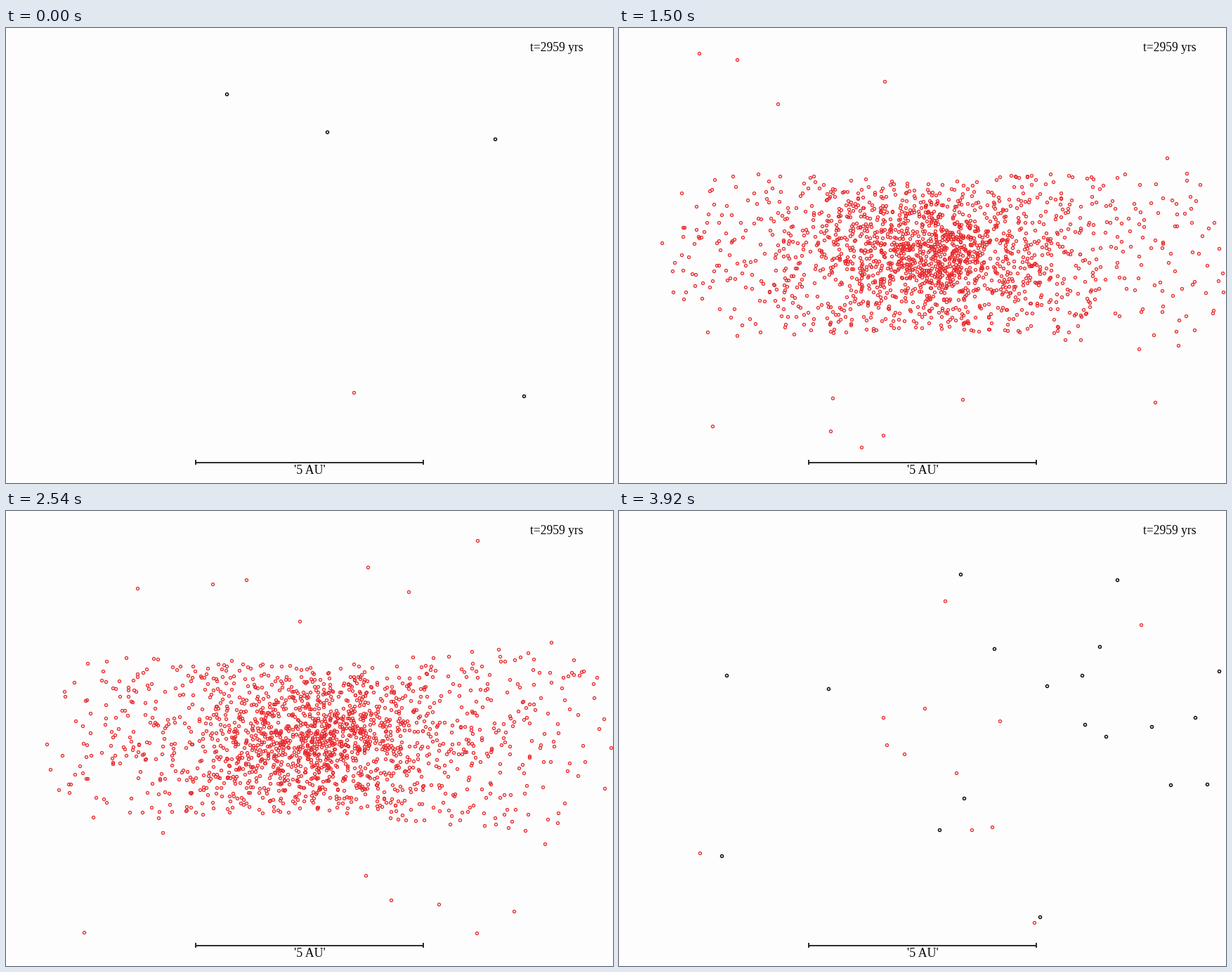
A matplotlib script that plays this animation: 864x648 px, repeating every 3.96 s.

```python
import numpy as np
import matplotlib.pyplot as plt
from matplotlib.animation import FuncAnimation

W, H = 864, 648
STEPS, LOOP = 95, 3960
MID, DEPTH = 48, 9.5          # step through the centre, pixels of depth per step
HALF = 3.5                    # half thickness of the visible slab, in steps
CX, CY, RADIUS = 434, 323, 425
FLAT = 1.8                    # vertical flattening of the cloud
INK, RED, PAPER = "#0c0c0c", "#e92b2e", "#fdfdfd"

rng = np.random.default_rng(2959)


def crossing(count, a, b):
    """Random steps at which stray bodies cross the slab."""
    return -HALF + (STEPS + 2 * HALF) * rng.beta(a, b, count)


def cloud():
    """Flattened, centrally peaked ball, cut off above and below."""
    r = np.linspace(0, RADIUS, 3000)
    cdf = np.cumsum(r**2 * (r**2 + 25**2) ** -1.3)
    count = int(4 * np.pi * 170 / FLAT * cdf[-1] * r[1])
    rad = np.interp(rng.random(count), cdf / cdf[-1], r)
    v = rng.normal(size=(3, count))
    dx, dy, dz = v / np.linalg.norm(v, axis=0) * rad
    dy /= FLAT
    keep = np.abs(dy) < 104 + 0.08 * np.abs(dx) + 0.03 * dx
    return np.column_stack([CX + dx + 0.07 * rad, CY + dy, MID + dz / DEPTH])[keep]


def bound_strays(count=150):
    """Lone bodies above and below the cloud."""
    x = rng.uniform(85, 780, count)
    y = CY + rng.choice([-1, 1], count) * rng.uniform(125, 290, count)
    return np.column_stack([x, y, crossing(count, 2, 1.6)])


def free_strays(count=300):
    """Escaped bodies outside the ball, mostly to the right."""
    x = W * rng.beta(2.2, 1, count)
    t = crossing(count, 1.54, 1)
    y = rng.normal(CY, 60 + 1.9 * np.abs(t - MID))
    outside = np.hypot(x - CX, (t - MID) * DEPTH) > RADIUS + 15
    return np.column_stack([x, y, t])[outside & (y > 12) & (y < 610)]


fig = plt.figure(figsize=(W / 72, H / 72), dpi=72, facecolor=PAPER)
ax = fig.add_axes([0, 0, 1, 1])
ax.set(xlim=(0, W), ylim=(H, 0))
ax.axis("off")


def rings(color, width):
    return ax.plot([], [], "o", ms=4, mfc="none", mec=color, mew=width)[0]


layers = [(rings(RED, 1.35), np.vstack([cloud(), bound_strays()])),
          (rings(INK, 1.5), free_strays())]

ax.plot([270, 594], [618.5, 618.5], color=INK, lw=1.7, solid_capstyle="butt")
for x in (270, 594):
    ax.plot([x, x], [615, 622], color=INK, lw=1.7, solid_capstyle="butt")
ax.text(432, 635, "'5 AU'", family="Liberation Serif", size=17.8, ha="center", va="baseline")
ax.text(746, 33, "t=2959 yrs", family="Liberation Serif", size=17.5, va="baseline")


def update(step):
    for artist, body in layers:
        seen = body[np.abs(body[:, 2] - step) < HALF]
        artist.set_data(seen[:, 0], seen[:, 1])
    return [artist for artist, _ in layers]


anim = FuncAnimation(fig, update, frames=STEPS, interval=LOOP / STEPS,
                     repeat=True, repeat_delay=0, blit=False)
plt.show()
```
